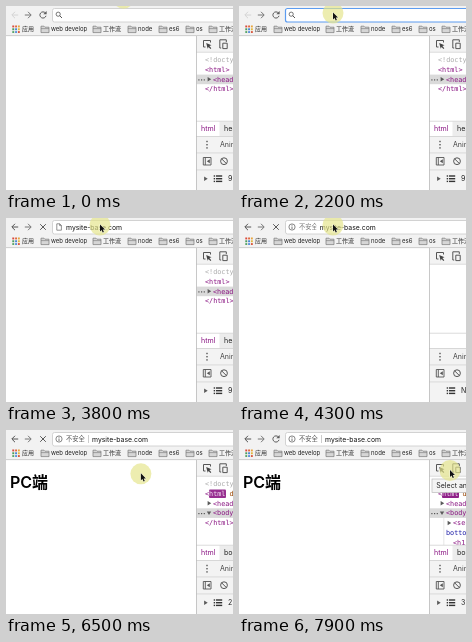
These frames come from a looping animation (227 px wide and 184 px high, 8 s). An HTML page:

```html
<!DOCTYPE html>
<html lang="zh-CN">
<head>
<meta charset="utf-8">
<title>Page load</title>
<style>
html, body { margin: 0; width: 100%; height: 100%; overflow: hidden; background: #fff; }
svg { display: block; width: 227px; height: 184px; font-family: Inter, "Noto Sans CJK SC", "Noto Sans CJK", sans-serif; }
text { white-space: pre; }
.mono { font: 6.8px "DejaVu Sans Mono", monospace; }
</style>
</head>
<body>
<svg id="stage" viewBox="0 0 227 184"></svg>
<script>
const LOOP = 8000;
const FOCUS = 1700, TYPED = 2700, ENTER = 3800, CLEARED = 4000, PARSED = 4700, BODY = 6300, LOADED = 7400, HOVER = 7800;
const stage = document.getElementById('stage');

const rect = (x, y, w, h, fill, extra = '') =>
  `<rect x="${x}" y="${y}" width="${w}" height="${h}" fill="${fill}" ${extra}/>`;
const ring = (x, y, r, color, width = 1) =>
  `<circle cx="${x}" cy="${y}" r="${r}" fill="none" stroke="${color}" stroke-width="${width}"/>`;
const line = (d, color = '#5a5a5a', width = 1) =>
  `<path d="${d}" fill="none" stroke="${color}" stroke-width="${width}"/>`;
const shape = (d, fill = '#5a5a5a', extra = '') => `<path d="${d}" fill="${fill}" ${extra}/>`;
const text = (x, y, s, size, fill = '#222', extra = '') =>
  `<text x="${x}" y="${y}" font-size="${size}" fill="${fill}" ${extra}>${s}</text>`;
const span = (s, fill, extra = '') => `<tspan fill="${fill}" ${extra}>${s}</tspan>`;

// Pointer path: time, x, y
const path = [
  [0, 117.5, -8.3], [300, 117.5, -8.3], [1100, 94, 6.5], [5300, 94, 6.5], [5800, 113, 28],
  [6100, 130, 43], [6400, 130, 43], [7200, 169, 45.5], [7900, 211, 40], [8000, 211, 40]
];

function pointerAt(t) {
  const s = Math.floor(t / 100) * 100;
  const i = Math.max(1, path.findIndex(p => p[0] > s));
  const [a, b] = [path[i - 1], path[i]];
  const k = (s - a[0]) / (b[0] - a[0]);
  return [a[1] + (b[1] - a[1]) * k, a[2] + (b[2] - a[2]) * k];
}

function pointer(t) {
  const [x, y] = pointerAt(t);
  const typing = t >= TYPED && t < ENTER;
  return `<g transform="translate(${x.toFixed(2)} ${y.toFixed(2)})">
    <circle cy=".5" r="${typing ? 9 : 10.5}" fill="#e4e58a" opacity="${typing ? .5 : .68}"/>` +
    shape('M0 0V7L1.6 5.6 2.7 8.1 3.9 7.6 2.8 5.1H5Z', '#111',
      'stroke="#fff" stroke-width=".6" paint-order="stroke"') + '</g>';
}

function navigation(t) {
  const loading = t >= ENTER && t < LOADED;
  const arrow = (x, dir, color) =>
    line(`M${x - 3.2 * dir} 9H${x + 3 * dir}M${x} 5.8L${x + 3.2 * dir} 9L${x} 12.2`, color);
  return arrow(9, -1, t >= ENTER ? '#555' : '#d4d4d4') + arrow(22, 1, '#777') +
    (loading ? line('M34.2 6.2L39.8 11.8M39.8 6.2L34.2 11.8')
      : line('M39.4 7A3.1 3.1 0 1 0 40 9.8') + shape('M40.6 5V8.3H37.3Z'));
}

const magnifier = y => line(`M53.6 ${y + .6}L56 ${y + 3}`, '#555') + ring(52.2, y - .8, 2.1, '#555', .8);
const pageIcon = y => line(`M50.8 ${y - 3.2}H53.8L55.4 ${y - 1.6}V${y + 3.2}H50.8ZM53.6 ${y - 3.2}V${y - 1.4}H55.4`, '#666', .7);

function addressBar(t) {
  const focused = t >= FOCUS && t < ENTER;
  let out = rect(46.5, 2.5, 200, 13.5, '#fff',
    `rx="2" stroke="${focused ? '#5c9cf0' : '#c9c9c9'}" stroke-width="${focused ? 1.2 : .8}"`);
  const url = x => text(x, 11.5, 'mysite-base.com', 6.85, '#111');
  const caret = x => rect(x, 5, .7, 8, '#111');
  if (t < TYPED) {
    out += magnifier(9);
    if (t >= FOCUS && t < FOCUS + 500) out += caret(60);
  } else if (t < CLEARED) {
    out += pageIcon(9) + url(60);
    if (focused) out += caret(116);
  } else {
    const p = t < PARSED ? Math.min(.8, (Math.floor(t / 100) - 39) * .2) : 1;
    const x = 60 + 26 * p;
    out += ring(53, 9, 3.1, '#555', .7) + line('M53 8.5V11M53 6.8V7.7', '#555', .8) +
      `<clipPath id="chip"><rect x="58" y="2" width="${x - 61.5}" height="14"/></clipPath>` +
      text(60, 11.4, '不安全', 6.3, '#555', `opacity="${p}" clip-path="url(#chip)"`) + url(x);
    if (p === 1) out += rect(82.2, 5, .6, 8, '#aaa');
  }
  return out;
}

function bookmarks() {
  const dots = ['#d9483b', '#e0683c', '#e8a33a', '#4a9c5c', '#4584d8', '#e3b83d', '#57a567', '#5b8fdc', '#d8573f'];
  const folders = [[35, 'web develop'], [87, '工作流'], [122, 'node'], [153, 'es6'], [180, 'os'], [203, '工作流']];
  return dots.map((c, i) => rect(6.3 + i % 3 * 2.8, 19.5 + Math.floor(i / 3) * 2.8, 1.9, 1.9, c)).join('') +
    text(16, 25.3, '应用', 6) +
    folders.map(([x, name]) =>
      shape(`M${x} 20.2H${x + 3}L${x + 4} 21.2H${x + 8}V26.6H${x}Z`, '#d6d6d6', 'stroke="#777" stroke-width=".7"') +
      line(`M${x} 22.6H${x + 8}`, '#777', .6) + text(x + 10, 25.3, name, 6)).join('');
}

const PURPLE = '#881280';
const tag = (name, attr = '') => span('&lt;' + name, PURPLE) + span(attr, '#994500');
const endTag = name => span(`&lt;/${name}&gt;`, PURPLE);
const mono = (x, y, s) => `<text class="mono" x="${x}" y="${y + 2.4}" fill="#222">${s}</text>`;
const closed = (x, y) => shape(`M${x - 1.4} ${y - 2.2}L${x + 2.2} ${y}L${x - 1.4} ${y + 2.2}Z`);
const opened = (x, y) => shape(`M${x - 2.2} ${y - 1.5}H${x + 2.2}L${x} ${y + 2}Z`);
const selected = y => rect(190.5, y - 4.7, 37, 9.6, '#dadada') +
  [192.3, 195, 197.7].map(x => rect(x, y, 1.2, 1.2, '#555')).join('');

// Tag name flashes purple when the page changes its attributes
function flashTag(t, y) {
  const start = t >= HOVER ? HOVER : BODY;
  const a = Math.max(0, 1 - (t - start) / 1600);
  const q = Math.round(a * 16) / 16;
  return rect(203, y - 4.2, 17, 8.4, PURPLE, `rx="1" opacity="${q}"`) +
    mono(199, y, span('&lt;', PURPLE) + span('html', q > .2 ? '#f6e8f6' : PURPLE) + span(' data', '#994500'));
}

function elements(t) {
  if (t >= CLEARED && t < PARSED) return '';
  const doctype = mono(199, 54, span('&lt;!doctype html&gt;', '#aaa'));
  const head = closed(203, 73.3) + mono(207, 73.3, tag('head'));
  if (t < CLEARED) {
    return doctype + mono(199, 63.7, tag('html&gt;')) + selected(73.3) + head + mono(199, 83, endTag('html'));
  }
  if (t < BODY) {
    return doctype + selected(63.7) + mono(199, 63.7, tag('html', ' data')) + head + mono(199, 83, endTag('html'));
  }
  const body = selected(83) + opened(203, 83) + mono(207, 83, tag('body'));
  const tail = t < LOADED ? mono(199, 93, endTag('html'))
    : rect(204.6, 88, .6, 27, '#d4d4d4') + closed(210, 93) + mono(214, 93, tag('section')) +
      mono(207, 102.6, span('bottom', '#1a1aa6')) + mono(214, 112.2, tag('h1'));
  return doctype + flashTag(t, 63.7) + head + body + tail;
}

function crumbs(t) {
  if (t >= CLEARED && t < PARSED) return '';
  const root = t >= PARSED && t < BODY;
  let out = rect(root ? 190.5 : 213.5, 115.5, root ? 23 : 14, 14.5, '#ececec') +
    text(195, 125, 'html', 7.1, root ? '#222' : PURPLE);
  if (!root) out += text(218, 125, t < CLEARED ? 'head' : 'body', 7.1);
  return out;
}

function consoleRow(t) {
  const empty = t >= CLEARED && t < BODY;
  const label = empty ? 'No messages' : (t < CLEARED ? 9 : t < LOADED ? 2 : 3) + ' messages';
  let out = empty ? '' : closed(199.5, 172.7);
  for (const y of [170, 172.7, 175.4]) {
    out += rect(207.7, y - .7, 1.4, 1.4, '#333') + rect(210, y - .7, 6.2, 1.4, '#333');
  }
  return out + text(222, 175.2, label, 7);
}

function devtools(t) {
  const rule = y => rect(190, y, 37, .7, '#ccc');
  return rect(190, 30, 37, 154, '#fff') + rect(190, 30, 37, 16, '#f3f3f3') +
    line('M199.5 41H197.5V34.5H204.5V36.5', '#555') +
    shape('M200.2 37L205.5 39.2 203.4 40.1 205.3 42.2 204.4 43 202.6 40.9 201.7 42.7Z', '#444') +
    line('M215.2 42H213.8V33.8H220.3V36', '#555') + line('M216.8 37.2H221.2V42.6H216.8Z', '#555') +
    elements(t) + rect(190, 115, 37, 15, '#fff') + crumbs(t) +
    rect(190, 130, 37, 54, '#f3f3f3') + [45.8, 114.8, 130, 146.6, 163.6].map(rule).join('') +
    [135.5, 138.7, 141.9].map(y => rect(200.3, y - .7, 1.4, 1.4, '#555')).join('') +
    text(214, 141.2, 'Animations', 7, '#444') +
    line('M197.3 151.5H205V159H197.3ZM199.3 151.5V159', '#555', .9) + shape('M203.8 153.2V157.2L200.8 155.2Z', '#555') +
    ring(218, 155.2, 3.4, '#555') + line('M215.6 152.8L220.4 157.6', '#555') +
    consoleRow(t) + rect(190, 30, .8, 154, '#bbb');
}

function suggestions() {
  const blue = '#2a6bd0', bold = 'font-weight="600"';
  const row = (y, s) => text(60, y + 2.4, s, 6.85, '#444');
  return rect(0, 19, 227, 42, '#fff') + rect(0, 21, 227, 12.5, '#e9e9e9') + rect(0, 60.6, 227, .8, '#d0d0d0') +
    pageIcon(27) + row(27, span('mysite-base.com', blue, bold) + ' - mobile') +
    pageIcon(39.5) + row(39.5, span('mysite-base.com', blue, bold) + span('/index.html', blue) + ' - hello nginx') +
    magnifier(52) + row(52, span('mysite-base.com', '#111') + ' - Lumora 搜索');
}

const tooltip = () => rect(193, 49, 40, 13.5, '#f4f4f4', 'stroke="#bbb" stroke-width=".7"') +
  text(197.3, 58.2, 'Select an element', 7);

function scene(t) {
  return rect(0, 0, 227, 184, '#fff') + rect(0, 0, 227, 30, '#f2f2f2') + rect(0, 29.3, 227, .8, '#c4c4c4') +
    navigation(t) + addressBar(t) + bookmarks() +
    (t >= BODY ? text(4, 57.5, 'PC端', 16, '#000', 'font-weight="600"') : '') +
    devtools(t) +
    (t >= TYPED && t < ENTER ? suggestions() : '') +
    (t >= HOVER ? tooltip() : '') + pointer(t);
}

let shown = '';
function draw(now) {
  const markup = scene(now % LOOP);
  if (markup !== shown) stage.innerHTML = shown = markup;
  requestAnimationFrame(draw);
}
draw(performance.now());
</script>
</body>
</html>
```
